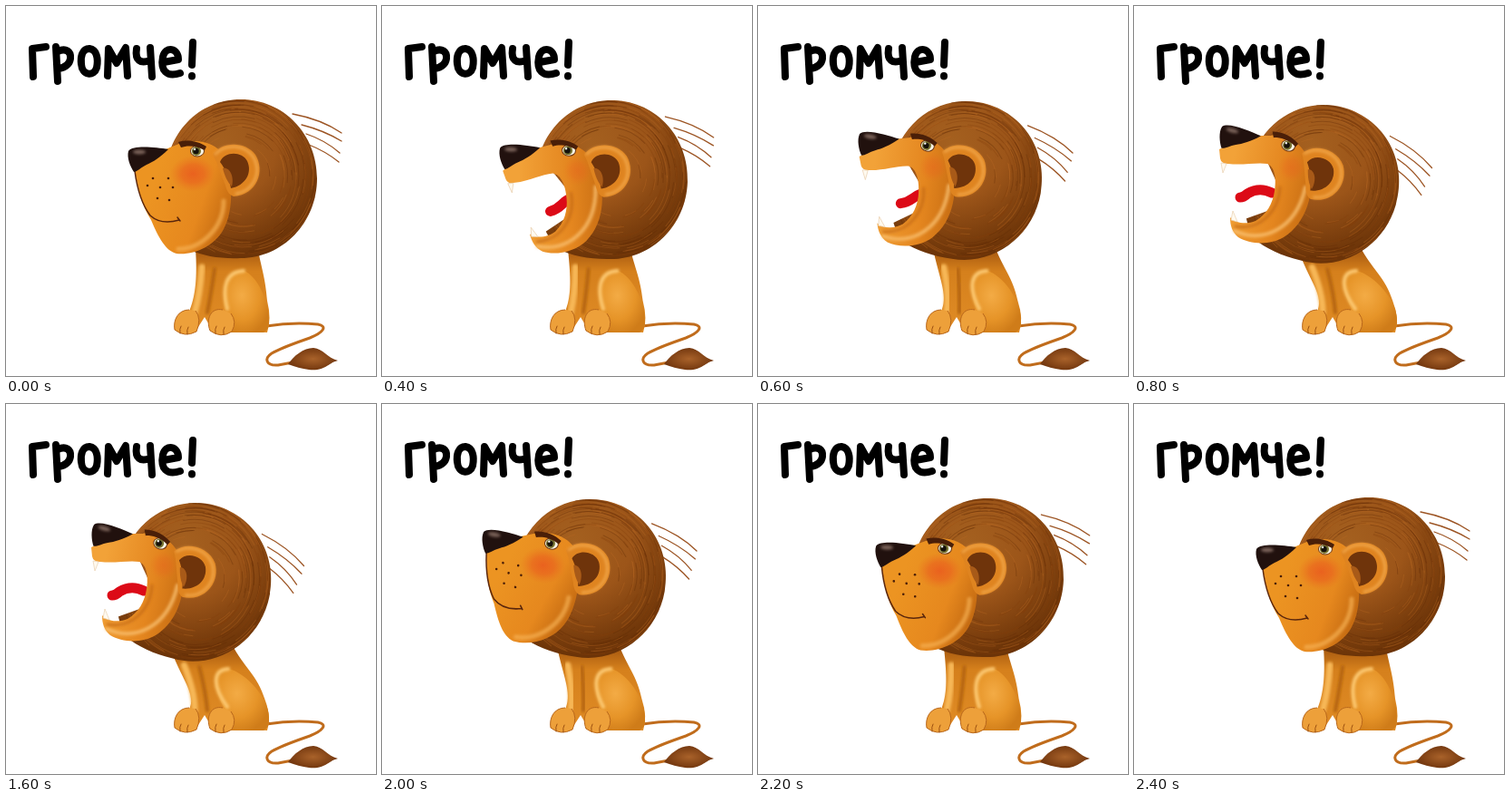
Write an HTML page that moves like this. It is 408 px wide and 408 px high and loops after 2.6 s.

```html
<!DOCTYPE html>
<html lang="ru">
<head>
<meta charset="utf-8">
<title>Громче!</title>
<style>
  html, body { margin: 0; width: 100%; height: 100%; overflow: hidden; background: #fff; }
  svg { display: block; width: 100vw; height: 100vh; }
  .line { fill: none; stroke-linecap: round; stroke-linejoin: round; }
</style>
</head>
<body>
<svg viewBox="0 0 408 408">
  <defs>
    <radialGradient id="maneFill" gradientUnits="userSpaceOnUse" cx="236" cy="152" r="125">
      <stop offset="0" stop-color="#a4601f"/>
      <stop offset=".5" stop-color="#9c5519"/>
      <stop offset="1" stop-color="#6c3408"/>
    </radialGradient>
    <linearGradient id="bodyFill" gradientUnits="userSpaceOnUse" x1="0" y1="270" x2="0" y2="360">
      <stop offset="0" stop-color="#a85a10"/>
      <stop offset=".25" stop-color="#d5801c"/>
      <stop offset="1" stop-color="#e08c26"/>
    </linearGradient>
    <radialGradient id="thighFill" cx=".4" cy=".4" r=".65">
      <stop offset="0" stop-color="#f3ab45"/>
      <stop offset=".6" stop-color="#e69428"/>
      <stop offset="1" stop-color="#cf7c19"/>
    </radialGradient>
    <linearGradient id="faceFill" gradientUnits="userSpaceOnUse" x1="165" y1="190" x2="248" y2="220">
      <stop offset="0" stop-color="#ec9422"/>
      <stop offset=".65" stop-color="#e6881e"/>
      <stop offset="1" stop-color="#c66c12"/>
    </linearGradient>
    <linearGradient id="jawFill" gradientUnits="userSpaceOnUse" x1="105" y1="190" x2="198" y2="210">
      <stop offset="0" stop-color="#f2a238"/>
      <stop offset=".6" stop-color="#e4861f"/>
      <stop offset="1" stop-color="#c66c12"/>
    </linearGradient>
    <radialGradient id="blush">
      <stop offset="0" stop-color="#ea5a1e" stop-opacity=".85"/>
      <stop offset=".5" stop-color="#ea5f1e" stop-opacity=".6"/>
      <stop offset="1" stop-color="#ea701e" stop-opacity="0"/>
    </radialGradient>
    <radialGradient id="tuftFill">
      <stop offset="0" stop-color="#a9622a"/>
      <stop offset="1" stop-color="#74380f"/>
    </radialGradient>
    <filter id="soft" x="-50%" y="-50%" width="200%" height="200%"><feGaussianBlur stdDeviation="1.6"/></filter>
  </defs>

  <!-- brush lettering -->
  <path class="line" role="img" aria-label="громче!" stroke="#000" stroke-width="8" d="
    M30 78L29 47L44 45
    M57 83L55 45M57 50C66 46 72 50 71 58C70 65 64 68 58 69
    M92 47C84 47 82 56 83 64C84 77 97 78 100 68C102 58 100 48 92 47
    M112 77L113 47L122 63L132 46L134 77
    M144 47C142 60 148 64 159 60M159 46L161 78
    M174 62L190 59C190 46 176 44 173 56C170 71 177 79 192 74
    M206 40L205 65M205 77v.5"/>

  <path class="line" stroke="#c06c1c" stroke-width="3" d="M287 353C305 350 325 349 344 351C355 353 350 360 335 366C318 372 303 377 293 383C284 389 287 397 300 396L316 393"/>
  <path fill="url(#tuftFill)" d="M311 395C317 386 328 377 339 377C350 378 354 388 366 391C356 393 352 403 334 401C326 400 319 398 311 395Z"/>

  <path id="body" fill="url(#bodyFill)"/>
  <path id="legLight" class="line" stroke="#f7b757" stroke-width="7" filter="url(#soft)"/>
  <path id="legShade" class="line" stroke="#b4640f" stroke-width="4" filter="url(#soft)"/>
  <path id="thigh" fill="url(#thighFill)"/>
  <path id="thighLight" class="line" stroke="#fcc871" stroke-width="4" filter="url(#soft)"/>
  <g fill="#eda03a" stroke="#b8661a">
    <path d="M202 335C190 335 184 346 186 357Q197 366 210 359Q216 345 209 336"/>
    <path d="M239 335C226 332 220 345 225 358Q237 367 249 359Q255 348 248 339"/>
  </g>
  <path class="line" stroke="#9c5010" d="M192 361q-1-5 1-8M200 362q-1-5 1-8M231 361q-1-5 1-8M240 362q-1-5 1-8"/>

  <g id="head">
    <path class="line" stroke="#9c5423" stroke-width="1.3" d="M316 119Q348 125 370 140M326 131Q350 137 370 149M331 141Q352 148 368 162M334 153Q352 160 367 172"/>
    <path fill="url(#maneFill)" d="M259 103C306 103 343 141 343 190C343 239 305 278 259 278C238 279 218 276 203 269C182 250 176 215 176 190C176 141 212 103 259 103Z"/>
    <g id="fur" class="line"></g>

    <g id="closed">
      <path fill="url(#faceFill)" d="M176 158L193 151C210 146 232 150 240 165C250 185 252 225 240 246C230 265 207 275 188 273C176 270 168 255 160 236C150 220 146 205 142 182L146 170Z"/>
      <path class="line" stroke="#f6b052" stroke-width="5" opacity=".7" filter="url(#soft)" d="M240 215C240 245 215 268 190 268"/>
      <path class="line" stroke="#5a260c" stroke-width="1.5" d="M142 182C145 205 150 219 159 231C169 240 181 239 191 236M189 233l3 4"/>
      <g id="dots" fill="#4a1e08"></g>
      <ellipse cx="206" cy="185" rx="25" ry="20" fill="url(#blush)"/>
    </g>

    <!-- drawn in the widest roaring pose, turned back to the rest pose -->
    <g id="open" transform="rotate(-16 259 190) translate(51 -6)">
      <path fill="#fff" d="M96 170L147 172L158 196L150 225L108 240Z"/>
      <path id="tongue" class="line" stroke="#dc0a17" stroke-width="11"/>
      <path fill="url(#jawFill)" d="M138 143L150 143C170 140 190 155 194 175C200 205 190 240 165 255C150 264 128 263 115 255C108 249 106 242 106 233C112 240 125 241 134 237C146 230 153 218 155 204C157 192 156 178 147 174C135 172 120 176 104 174Q96 174 95 168L94 158L115 148Z"/>
      <path class="line" stroke="#f9c070" stroke-width="4" opacity=".8" filter="url(#soft)" d="M111 248C140 262 178 248 189 200"/>
      <path class="line" stroke="#c06612" stroke-width="3" opacity=".7" filter="url(#soft)" d="M112 243C140 248 160 225 161 200"/>
      <path fill="#fffaf0" stroke="#e9cfae" stroke-width=".7" d="M96 173l2 11l4-10ZM107 236l2-10l5 12Z"/>
      <ellipse cx="174" cy="178" rx="16" ry="17" fill="url(#blush)" opacity=".45"/>
    </g>

    <path fill="#df8420" d="M228 164C238 149 264 149 275 164C286 182 277 208 251 210C245 208 243 202 242 198L232 172Z"/>
    <path class="line" stroke="#f0a446" stroke-width="3" filter="url(#soft)" d="M231 163C242 152 263 152 273 167C282 183 274 203 254 207"/>
    <path fill="#6f340b" d="M236 172C241 160 260 160 266 171C272 184 264 198 248 201C246 190 242 180 236 172Z"/>
    <path fill="#a85a18" d="M239 179C246 177 252 187 249 199C244 194 241 187 239 179Z"/>

    <ellipse cx="211" cy="160" rx="7.5" ry="6" fill="#fbf5e4" stroke="#6a3411"/>
    <circle cx="210" cy="160" r="5" fill="#757230"/>
    <circle cx="209.5" cy="160" r="3.2" fill="#15100a"/>
    <circle cx="208" cy="158" r="1.2" fill="#fff"/>
    <path fill="#4a1f08" d="M190 150C200 147 212 149 221 155L219 159C208 153 199 154 193 156Z"/>

    <path fill="#21110e" d="M135 160C140 153 165 156 179 158C170 167 162 172 155 175C149 178 144 183 141 183C137 177 133 167 135 160Z"/>
    <ellipse cx="147" cy="161" rx="7" ry="2.5" fill="#b79a8c" opacity=".6" filter="url(#soft)"/>
  </g>
</svg>
<script>
const $ = id => document.getElementById(id);

let seed = 7;
const rnd = () => (seed = seed * 16807 % 2147483647) / 2147483647;

// mane strands: short arcs around the head
let strands = "";
for (let i = 0; i < 190; i++) {
  const r = 0.4 + 0.61 * Math.sqrt(rnd()), a = rnd() * 6.283, b = a + 0.25 + rnd() * 0.6;
  const at = (t, k) => `${(259 + 83 * k * Math.cos(t)).toFixed(1)} ${(190 + 87 * k * Math.sin(t)).toFixed(1)}`;
  const tone = ["#5f2a06", "#b96a24", "#84400c"][i % 3];
  strands += `<path d="M${at(a, r)}A${83 * r} ${87 * r} 0 0 1 ${at(b, r - 0.02)}" stroke="${tone}" opacity=".35"/>`;
}
$("fur").innerHTML = strands;

$("dots").innerHTML = [[162, 190], [179, 190], [156, 198], [170, 200], [184, 200], [167, 212], [180, 214]]
  .map(([x, y]) => `<circle cx="${x}" cy="${y}" r="1.3"/>`).join("");

const tongues = {
  short: "M157 206C148 208 146 214 134 214",
  wavy: "M153 204C142 203 140 209 131 209C125 208 124 204 116 206",
  low: "M152 206C140 200 130 204 125 207C122 210 119 211 117 211"
};

// head shift, tilt, and how far the shoulders lean
const rest = [0, 0, 0, 0], start = [-6, 1, 2, -4], half = [-30, 2, 10, -16], full = [-51, 6, 16, -28];
// end time, pose, tongue when the mouth is open
const steps = [
  [400, rest], [600, start, "short"], [800, half, "short"], [1000, full, "low"],
  [1600, full, "wavy"], [2000, full, "low"], [2200, half], [2400, start], [2600, rest]
];

function show([, [dx, dy, tilt, k], tongue]) {
  const draw = (id, d) => $(id).setAttribute("d", d);
  $("head").setAttribute("transform", `translate(${dx} ${dy}) rotate(${tilt} 259 190)`);
  draw("body", `M${209 + k} 268C${211 + k * 0.7} 300 209 318 203 334L197 357L210 357L219 343L228 358L288 360
    Q293 345 ${288 + k * 0.1} 325C${286 + k * 0.3} 300 ${282 + k * 0.7} 290 ${277 + k} 265Z`);
  draw("legLight", `M${216 + k * 0.7} 288Q${214 + k * 0.2} 318 208 338`);
  draw("legShade", `M${230 + k * 0.6} 290Q${226 + k * 0.2} 318 222 338`);
  const curve = `C${238 + k * 0.4} 310 ${242 + k * 0.5} 293 ${262 + k * 0.6} 292`;
  draw("thigh", `M241 336${curve}C${276 + k * 0.4} 296 290 325 290 345Q291 357 284 360L246 360Z`);
  draw("thighLight", `M244 334${curve}`);
  $("open").style.display = tongue ? "" : "none";
  $("closed").style.display = tongue ? "none" : "";
  if (tongue) draw("tongue", tongues[tongue]);
}

let shown;
function tick() {
  const t = performance.now() % 2600;
  const step = steps.find(s => t < s[0]);
  if (step !== shown) show(shown = step);
  requestAnimationFrame(tick);
}
tick();
</script>
</body>
</html>
```
